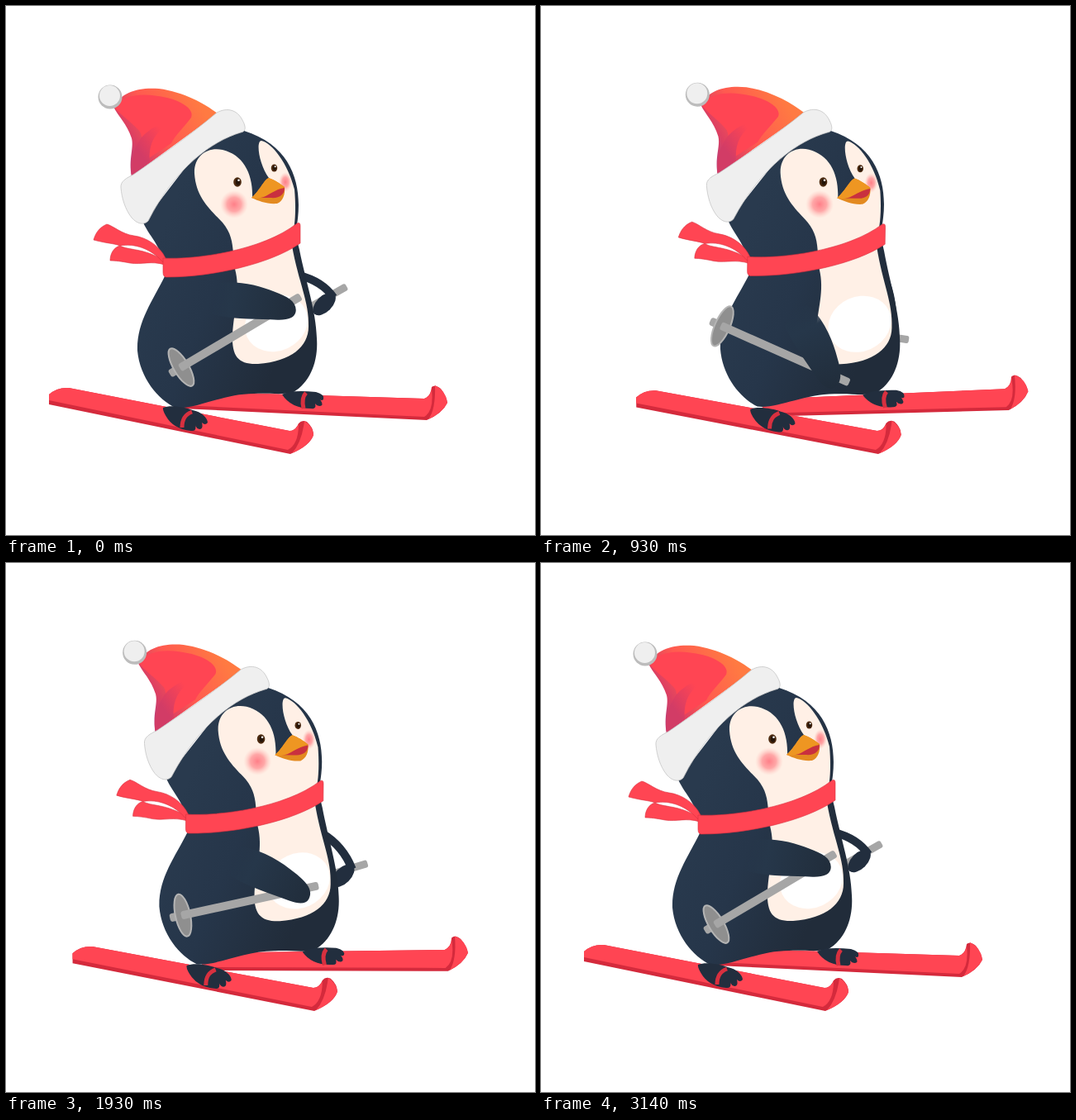
Animation of 640x640 px, one loop 3210 ms. Source, as an HTML page:

```html
<!DOCTYPE html>
<html lang="en">
<head>
<meta charset="utf-8">
<title>Skiing penguin</title>
<style>
html, body { margin: 0; height: 100%; overflow: hidden; background: #fff; }
svg { display: block; width: 100vw; height: 100vh; }
.red { fill: #ff4553; }
.edge { fill: #d42a3c; }
.dark { fill: #222e3e; }
.cream { fill: #fff0e6; }
.rod { fill: #a6a6a6; }
.strap { fill: none; stroke: #d8303f; stroke-width: 5; }
.scarf { fill: #ff4553; stroke: #d8303f; stroke-width: .6; }
</style>
</head>
<body>
<svg viewBox="0 0 640 640">
  <defs>
    <linearGradient id="coat" gradientUnits="userSpaceOnUse" x1="165" y1="330" x2="340" y2="400">
      <stop offset="0" stop-color="#293a4e"/><stop offset=".45" stop-color="#26364a"/><stop offset="1" stop-color="#212c3a"/>
    </linearGradient>
    <linearGradient id="sleeve" gradientUnits="userSpaceOnUse" x1="-112" y1="0" x2="0" y2="0">
      <stop offset="0" stop-color="#26364a" stop-opacity="0"/><stop offset=".3" stop-color="#26374a"/><stop offset="1" stop-color="#212d3b"/>
    </linearGradient>
    <linearGradient id="felt" gradientUnits="userSpaceOnUse" x1="140" y1="180" x2="235" y2="120">
      <stop offset="0" stop-color="#b8407c"/><stop offset=".2" stop-color="#dc3f62"/><stop offset=".5" stop-color="#ff5a50"/><stop offset="1" stop-color="#ff7a42"/>
    </linearGradient>
    <linearGradient id="fold" gradientUnits="userSpaceOnUse" x1="158" y1="172" x2="188" y2="150">
      <stop offset="0" stop-color="#d23c66"/><stop offset="1" stop-color="#ff4553"/>
    </linearGradient>
    <radialGradient id="blush">
      <stop offset="0" stop-color="#ff7f88"/><stop offset=".5" stop-color="#ff9a9c" stop-opacity=".85"/><stop offset="1" stop-color="#ffc8c0" stop-opacity="0"/>
    </radialGradient>
  </defs>

  <g class="rightSki">
    <path class="edge" d="M212 466L506 475Q514 472 515 461Q519 457 526 463Q533 472 534 480Q528 493 509 501L212 487Z"/>
    <path class="red" d="M212 466L506 475Q514 472 515 463Q518 490 506 497L212 483Z"/>
    <path class="red" d="M519 459Q532 465 534 480Q528 492 511 500Q520 488 519 459Z"/>
  </g>
  <g class="leftSki">
    <path class="edge" d="M52 470Q62 461 76 462L343 514Q350 514 354 505Q358 500 364 503Q372 510 372 519Q368 532 344 542L52 482Z"/>
    <path class="red" d="M52 470Q62 461 76 462L343 514Q350 514 354 506Q354 530 341 537L52 477Z"/>
    <path class="red" d="M361 502Q371 508 372 519Q367 532 346 541Q358 528 361 502Z"/>
  </g>

  <g id="upper">
    <rect id="farRod" class="rod" x="-58" y="-4.500" width="60" height="9" rx="2.500"/>
    <path id="farArm" fill="none" stroke="#222e3e" stroke-width="10"/>
    <ellipse id="farHand" class="dark" rx="17" ry="9.500"/>

    <g id="torso">
      <path fill="url(#coat)" d="M166 262C175 282 191 292 193 325C177 358 158 382 159 417C162 450 184 476 205 486C228 489 262 469 300 469C320 468 335 471 348 467C368 455 378 430 376 402C375 368 363 335 355 295L350 275C360 230 355 172 288 151L235 172Z"/>
      <path class="cream" d="M277 318C284 345 276 365 274 398C273 425 282 434 305 433C345 430 366 412 366 388C367 358 354 335 346 290Z"/>
      <ellipse cx="327" cy="384" rx="39" ry="33" fill="#fff" transform="rotate(-25 327 384)"/>
      <path class="cream" d="M228 203C227 182 243 170 262 174C287 180 299 203 298 232L318 208C306 192 302 163 309 163C322 166 341 190 349 222C351 245 350 262 347 275L275 300C274 285 272 274 262 262C247 246 230 232 228 203Z"/>
      <circle cx="276" cy="240" r="17" fill="url(#blush)"/>
      <ellipse cx="338" cy="213" rx="8" ry="12" fill="url(#blush)"/>
      <g class="eye" transform="translate(280 213)"><g><ellipse rx="4.800" ry="5.800" fill="#4c2a10"/><ellipse cx=".5" rx="2.600" ry="3.800" fill="#251509"/><circle cx="1.500" cy="-2.300" r="1.300" fill="#fff"/></g></g>
      <g class="eye" transform="translate(324.500 196) scale(.78)"><g><ellipse rx="4.800" ry="5.800" fill="#4c2a10"/><ellipse cx=".5" rx="2.600" ry="3.800" fill="#251509"/><circle cx="1.500" cy="-2.300" r="1.300" fill="#fff"/></g></g>
      <path fill="#e38a20" d="M297 232C306 225 312 210 318 208C324 210 332 215 337 219C338 228 335 236 328 239C316 240 306 236 297 232Z"/>
      <path fill="#c9303f" d="M306 232C318 229 325 222 337 220C337 228 331 233 320 232Z"/>
      <path fill="#ee9622" d="M297 232C306 225 312 210 318 208C324 210 332 215 337 219C328 221 322 226 312 231Q303 234 297 232Z"/>

      <path fill="url(#felt)" d="M130 122C140 104 160 98 185 100C215 104 240 118 256 130L152 206C148 185 155 172 152 160C146 142 136 134 130 122Z"/>
      <path class="red" d="M131 122C142 107 165 104 195 111C215 116 228 126 224 135C214 148 205 156 200 166L170 186C164 170 166 160 162 152C152 140 138 132 131 122Z"/>
      <path fill="url(#fold)" d="M152 206C149 184 156 172 163 160C175 146 190 141 201 141C182 150 172 165 174 188Z"/>
      <circle cx="126" cy="110" r="14.500" fill="#bcbcbc"/>
      <circle cx="125.500" cy="108.500" r="12.500" fill="#efefef"/>
      <path fill="#efefef" stroke="#c6c6c6" stroke-width=".8" d="M139 220C138 212 146 208 154 204C185 183 222 157 255 129C268 122 280 126 286 138C291 147 290 152 284 153C250 163 205 195 172 260C166 266 158 263 152 256C144 246 140 232 139 220Z"/>

      <path class="scarf" d="M192 313C175 308 165 313 150 311C140 309 132 308 126 308C126 300 130 292 138 290C148 296 165 292 192 308Z"/>
      <path class="scarf" d="M193 305C186 290 170 280 155 278C140 276 130 266 122 264C112 268 108 276 106 283C120 287 130 287 138 290C155 287 175 293 190 310Z"/>
      <path class="scarf" d="M190 305C230 307 310 296 352 263Q356 261 356 266V287C320 312 250 328 194 328Q190 328 190 322Z"/>
    </g>

    <g id="pole">
      <rect class="rod" x="-184" y="-5" width="16" height="10" rx="3"/>
      <ellipse cx="-168" rx="9" ry="26" fill="#8f8f8f" stroke="#b4b4b4" stroke-width="2"/>
      <rect class="rod" x="-170" y="-5" width="170" height="10" rx="3"/>
    </g>
    <path id="arm" fill="url(#sleeve)" d="M0 0C0-12-12-17-30-20C-50-24-75-26-100-18Q-116 0-100 20C-70 22-45 16-20 13Q0 10 0 0Z"/>
  </g>

  <g class="rightSki">
    <path class="dark" d="M334 470Q345 464 375 467Q386 470 384 476Q382 478 380 476Q385 483 380 484Q376 484 374 481Q376 488 369 487Q345 487 334 470Z"/>
    <path class="strap" d="M360 487Q357 474 363 468"/>
  </g>
  <g class="leftSki">
    <path class="dark" d="M190 486C200 482 218 486 226 489C236 491 244 498 244 504Q241 508 237 504Q239 512 234 512Q230 511 229 507Q231 515 224 514Q205 512 196 500Q189 490 190 486Z"/>
    <path class="strap" d="M213 510C213 499 217 494 225 491"/>
  </g>
</svg>
<script>
const LOOP = 3210, FRAME = LOOP / 45, PLANT = 430;
const ARM = 100, GRIP = 20, FAR_ARM = 70;

// When each part pushes off and when it drifts back to rest
const travel = { push: [400, 690], back: [950, 2810] };
const swing = { push: [480, 930], back: [930, 2620] };
const balance = { push: [520, 930], back: [1100, 2950] };

function ease(t, [from, to]) {
  const u = Math.min(1, Math.max(0, (t - from) / (to - from)));
  return u * u * u * (u * (6 * u - 15) + 10);
}

const polar = (x, y, length, degrees) => {
  const a = degrees * Math.PI / 180;
  return [x + length * Math.cos(a), y + length * Math.sin(a)];
};

function place(selector, x, y, turn = 0, pivot = '') {
  for (const el of document.querySelectorAll(selector))
    el.setAttribute('transform', `translate(${x} ${y}) rotate(${turn} ${pivot})`);
}

function pose(t) {
  // Blend from rest to pole plant, through the push, and back to rest
  const move = (clock, rest, plant, pushed) => rest
    + (plant - rest) * ease(t, [0, PLANT])
    + (pushed - plant) * ease(t, clock.push)
    + (rest - pushed) * ease(t, clock.back);

  const slide = move(travel, 0, .04, 1);
  place('.leftSki', 64 * slide, move(balance, 0, -6, 0), move(balance, 0, 1.5, -.7), '343 542');
  place('.rightSki', 57 * slide, move(balance, 0, 3, -12), move(balance, 0, -1.7, -4.2), '508 501');
  place('#upper', 57 * slide, 0);

  const lean = move(balance, 0, 10, 1);
  place('#torso', 0, -.26 * lean, lean, '270 470');

  const armTurn = move(swing, 10, -19, 64);
  const poleTurn = move(swing, -30.7, -64.8, 24);
  const wing = polar(move(swing, 252, 277, 253), move(swing, 353, 425, 372), ARM, armTurn);
  place('#arm', ...wing, armTurn);
  place('#pole', ...polar(...wing, GRIP, poleTurn - 42), poleTurn);

  const farTurn = .7 * poleTurn - 8;
  const farEnd = polar(341, 350, FAR_ARM, move(swing, -8, -9, 50));
  const [hx, hy] = polar(farEnd[0], farEnd[1] + 6, -29, farTurn);
  const sx = 355 + 2.6 * lean, sy = 326 + 1.6 * lean;
  place('#farRod', ...farEnd, farTurn);
  place('#farHand', hx, hy, -45);
  document.getElementById('farArm').setAttribute('d',
    `M${sx} ${sy}Q${(sx + hx) / 2 + 13} ${(sy + hy) / 2 - 10} ${hx + 11} ${hy - 8}`);

  const shut = .9 * Math.max(0, 1 - Math.abs(t - 1560) / 130);
  for (const el of document.querySelectorAll('.eye > g')) el.setAttribute('transform', `scale(1 ${1 - shut})`);
}

const start = performance.now();
function tick() {
  const t = (performance.now() - start) % LOOP;
  const step = Math.min(44, Math.floor((t + 5) / FRAME));
  pose(step < 2 ? 0 : step * FRAME);
  requestAnimationFrame(tick);
}
tick();
</script>
</body>
</html>
```
